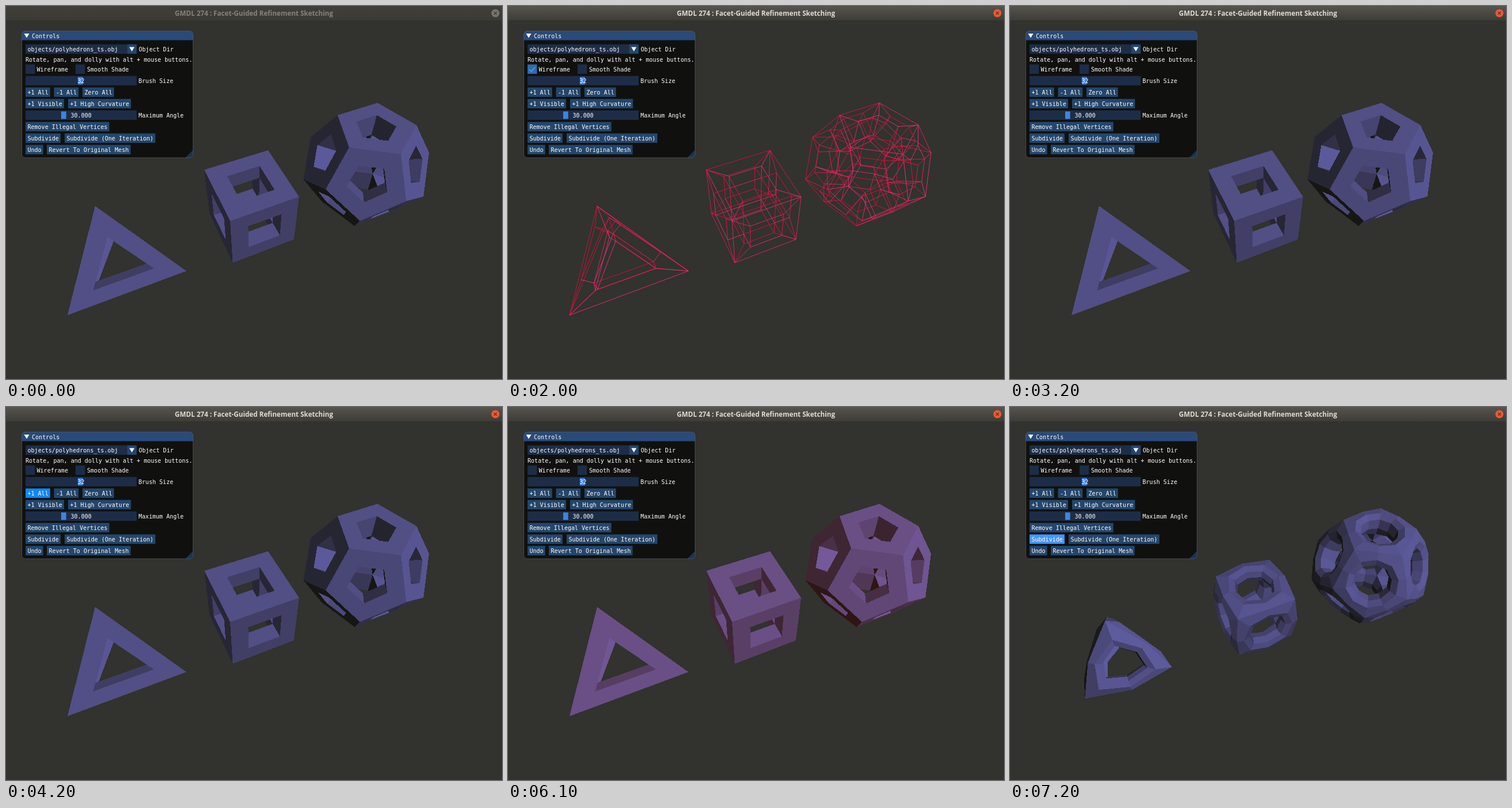
An HTML page with a canvas for the animation above (8000 ms loop, 863 px wide and 649 px high).

```html
<!DOCTYPE html>
<html lang="en">
<head>
<meta charset="utf-8">
<title>Mesh viewer</title>
<style>
html, body { margin: 0; width: 100%; height: 100%; overflow: hidden; background: #32322e; }
canvas { display: block; }
</style>
</head>
<body>
<canvas id="stage" width="863" height="649"></canvas>
<script>
const W = 863, H = 649, LOOP = 8000, PHI = (1 + Math.sqrt(5)) / 2, AMBIENT = 0.25;
const ctx = document.getElementById('stage').getContext('2d');

// Vector helpers
const add = (a, b) => a.map((v, i) => v + b[i]);
const sub = (a, b) => a.map((v, i) => v - b[i]);
const mul = (a, s) => a.map(v => v * s);
const dot = (a, b) => a[0] * b[0] + a[1] * b[1] + a[2] * b[2];
const cross = (a, b) => [a[1] * b[2] - a[2] * b[1], a[2] * b[0] - a[0] * b[2], a[0] * b[1] - a[1] * b[0]];
const unit = a => mul(a, 1 / (Math.hypot(...a) || 1));
const mean = list => mul(list.reduce(add), 1 / list.length);

// All sign variants and cyclic shifts of a vector
function signs(v) {
  const out = [];
  for (let m = 0; m < 8; m++) {
    if (v.every((c, i) => c || !(m >> i & 1))) out.push(v.map((c, i) => m >> i & 1 ? -c : c));
  }
  return out;
}
const cyclic = ([x, y, z]) => [[x, y, z], [z, x, y], [y, z, x]].flatMap(signs);

// Hollow frame of a convex solid: every face gets a half-size hole leading inside
function frameMesh(corners, normals) {
  const verts = [...corners, ...corners.map(v => mul(v, 0.5))];
  const quads = [], n = corners.length;
  for (const dir of normals) {
    const top = Math.max(...corners.map(v => dot(v, dir)));
    const ids = [...corners.keys()].filter(i => dot(corners[i], dir) > top - 0.01);
    const mid = mean(ids.map(i => corners[i]));
    const ax = unit(sub(corners[ids[0]], mid)), ay = cross(unit(dir), ax);
    const angle = i => {
      const d = sub(corners[i], mid);
      return Math.atan2(dot(d, ay), dot(d, ax));
    };
    ids.sort((a, b) => angle(a) - angle(b));
    const base = verts.length, count = ids.length;
    ids.forEach(i => verts.push(mul(add(corners[i], mid), 0.5)));
    ids.forEach((id, i) => {
      const j = (i + 1) % count, next = ids[j];
      quads.push([id, next, base + j, base + i], [base + i, base + j, next + n, id + n]);
    });
  }
  return { verts, quads };
}

// One Catmull-Clark step
function subdivide({ verts, quads }) {
  const centers = quads.map(q => mean(q.map(i => verts[i])));
  const edges = new Map(), around = verts.map(() => ({ faces: [], mids: [] }));
  const key = (a, b) => a < b ? a + '_' + b : b + '_' + a;
  quads.forEach((q, f) => q.forEach((a, i) => {
    const b = q[(i + 1) % 4], k = key(a, b);
    around[a].faces.push(centers[f]);
    if (!edges.has(k)) {
      const mid = mul(add(verts[a], verts[b]), 0.5);
      edges.set(k, { a, b, faces: [] });
      around[a].mids.push(mid);
      around[b].mids.push(mid);
    }
    edges.get(k).faces.push(centers[f]);
  }));
  const out = verts.map((v, i) => {
    const { faces, mids } = around[i], n = mids.length;
    return mul(add(add(mean(faces), mul(mean(mids), 2)), mul(v, n - 3)), 1 / n);
  });
  const first = out.length;
  out.push(...centers);
  for (const e of edges.values()) {
    e.id = out.length;
    out.push(mean([verts[e.a], verts[e.b], ...e.faces]));
  }
  const parts = quads.flatMap((q, f) => q.map((a, i) => [
    a, edges.get(key(a, q[(i + 1) % 4])).id, first + f, edges.get(key(q[(i + 3) % 4], a)).id
  ]));
  return { verts: out, quads: parts };
}

// view: screen x, y and depth of the box corner and its three neighbours
const tetra = [[-1, -1, -1], [1, 1, -1], [1, -1, 1], [-1, 1, 1]];
const solids = [
  {
    mesh: frameMesh(tetra, tetra.map(v => mul(v, -1))),
    view: [[155, 348, 1], [209.3, 505.6, 0.99], [58.1, 393.1, 1.09], [267, 327.9, 1.18]],
    light: [0.07, -0.84, -0.08]
  },
  {
    mesh: frameMesh(signs([1, 1, 1]), cyclic([0, 0, 1])),
    view: [[345, 285, 1], [456, 251, 1.049], [390, 374, 0.903], [354, 361, 1.12]],
    light: [0.02, 0.35, -0.57]
  },
  {
    mesh: frameMesh([...signs([1, 1, 1]), ...cyclic([0, 1 / PHI, PHI])], cyclic([0, PHI, 1])),
    view: [[597, 246, 1], [714, 207, 1.047], [616, 374, 1.055], [530, 228, 1.156]],
    light: [0.19, -0.263, -0.658]
  }
];

function project(p, view) {
  const [u, v, s] = p.map(c => (c + 1) / 2);
  let x = 0, y = 0, w = 0;
  [1 - u - v - s, u, v, s].forEach((k, i) => {
    const m = k * view[i][2];
    x += m * view[i][0];
    y += m * view[i][1];
    w += m;
  });
  return { x: x / w, y: y / w, z: 1 / w };
}

// Projected quads with their brightness
function facets({ view, light }, { verts, quads }) {
  const pts = verts.map(v => project(v, view));
  return quads.map(q => {
    const [a, b, c, d] = q.map(i => verts[i]);
    const n = unit(cross(sub(c, a), sub(d, b)));
    return { pts: q.map(i => pts[i]), lit: Math.min(1, Math.max(0, AMBIENT + dot(n, light))) };
  });
}

function layer() {
  const c = document.createElement('canvas');
  c.width = W;
  c.height = H;
  return c;
}

// Flat shaded picture with a depth buffer
function shaded(list, red) {
  const canvas = layer(), g = canvas.getContext('2d');
  const img = g.createImageData(W, H), depth = new Float32Array(W * H);
  const fill = (a, b, c, rgb) => {
    const area = (b.x - a.x) * (c.y - a.y) - (b.y - a.y) * (c.x - a.x);
    if (Math.abs(area) < 1e-6) return;
    const xs = [a.x, b.x, c.x], ys = [a.y, b.y, c.y];
    for (let y = Math.floor(Math.min(...ys)); y <= Math.max(...ys); y++) {
      for (let x = Math.floor(Math.min(...xs)); x <= Math.max(...xs); x++) {
        const px = x + 0.5, py = y + 0.5;
        const kb = ((px - a.x) * (c.y - a.y) - (py - a.y) * (c.x - a.x)) / area;
        const kc = ((b.x - a.x) * (py - a.y) - (b.y - a.y) * (px - a.x)) / area;
        const ka = 1 - kb - kc;
        if (ka < 0 || kb < 0 || kc < 0) continue;
        const z = ka * a.z + kb * b.z + kc * c.z, at = y * W + x;
        if (z <= depth[at]) continue;
        depth[at] = z;
        img.data.set(rgb, at * 4);
      }
    }
  };
  for (const { pts: [a, b, c, d], lit } of list) {
    const rgb = [22 + red + 72 * lit, 22 + 69 * lit, 20 + 137 * lit, 255];
    fill(a, b, c, rgb);
    fill(a, c, d, rgb);
  }
  g.putImageData(img, 0, 0);
  return canvas;
}

// Neighbouring quads run along a shared edge in opposite directions, so one direction draws it once
function wired(list) {
  const canvas = layer(), g = canvas.getContext('2d');
  g.lineWidth = 0.85;
  for (const { pts, lit } of list) {
    g.strokeStyle = `rgb(${222 + 22 * lit}, ${16 + 42 * lit}, ${60 + 75 * lit})`;
    g.beginPath();
    pts.forEach((a, i) => {
      const b = pts[(i + 1) % 4];
      if (a.x > b.x) return;
      g.moveTo(a.x, a.y);
      g.lineTo(b.x, b.y);
    });
    g.stroke();
  }
  return canvas;
}

const coarse = solids.flatMap(s => facets(s, s.mesh));
const fine = solids.flatMap(s => facets(s, subdivide(s.mesh)));
const pics = { plain: shaded(coarse, 0), marked: shaded(coarse, 24), smooth: shaded(fine, 0), wire: wired(coarse) };

// Pointer states: time, control, pressed
const steps = [
  [0], [500, 'wire', 1], [600, 'wire'], [2000, 'wire', 1], [2100, 'wire'], [2800, 'brush'],
  [3200], [3300, 'add'], [4200, 'add', 1], [4300, 'add'], [5200], [5300, 'visible'],
  [5600], [5700, 'angle'], [6100], [6200, 'remove'], [6600], [6700, 'subdivide'],
  [7000, 'subdivide', 1], [7200, 'subdivide']
];

const INK = '#fff', FIELD = ['#1d2d47', '#24466c', '#316aac'], BUTTON = ['#24466c', '#4296fa', '#0f87fa'];
const ROW = 16.4, CHAR = 6.06;

function box(x, y, w, h, color) {
  ctx.fillStyle = color;
  ctx.fillRect(x, y, w, h);
}

// Control background centred on a row
const field = (x, y, w, color) => box(x, y - ROW / 2 - 0.1, w, ROW, color);

function label(text, x, y) {
  ctx.font = '10.06px "DejaVu Sans Mono", monospace';
  ctx.textAlign = 'left';
  ctx.fillStyle = INK;
  ctx.fillText(text, x, y + 3.6);
}

function arrow(x, y) {
  ctx.fillStyle = INK;
  ctx.beginPath();
  ctx.moveTo(x - 4.5, y - 3.5);
  ctx.lineTo(x + 4.5, y - 3.5);
  ctx.lineTo(x, y + 4);
  ctx.fill();
}

function titleBar(focused) {
  const fade = ctx.createLinearGradient(0, 0, 0, 25);
  fade.addColorStop(0, focused ? '#56544d' : '#403f3a');
  fade.addColorStop(1, focused ? '#3d3c37' : '#3b3a35');
  box(0, 0, W, 25, fade);
  ctx.font = 'bold 11.7px "Open Sans", sans-serif';
  ctx.textAlign = 'center';
  ctx.fillStyle = focused ? '#dfdbd2' : '#85827a';
  ctx.fillText('GMDL 274 : Facet-Guided Refinement Sketching', 431.5, 16.5);
  ctx.fillStyle = focused ? '#ea5a35' : '#77756e';
  ctx.beginPath();
  ctx.arc(851.5, 12.5, 7, 0, 7);
  ctx.fill();
  ctx.strokeStyle = focused ? '#6b2a18' : '#3c3b37';
  ctx.lineWidth = 1.2;
  ctx.beginPath();
  ctx.moveTo(849, 10);
  ctx.lineTo(854, 15);
  ctx.moveTo(854, 10);
  ctx.lineTo(849, 15);
  ctx.stroke();
}

function panel(mode, checked) {
  ctx.beginPath();
  ctx.roundRect(27.5, 43.5, 298, 220.5, 6);
  ctx.fillStyle = '#10110e';
  ctx.fill();
  ctx.save();
  ctx.clip();
  box(27, 43, 299, 16.5, '#294a7a');
  ctx.fillStyle = '#1b3553';
  ctx.beginPath();
  ctx.moveTo(326, 250);
  ctx.lineTo(326, 265);
  ctx.lineTo(311, 265);
  ctx.fill();
  ctx.restore();
  ctx.beginPath();
  ctx.roundRect(27.5, 43.5, 298, 220.5, 6);
  ctx.strokeStyle = 'rgba(110, 110, 128, 0.5)';
  ctx.lineWidth = 1;
  ctx.stroke();
  arrow(36, 51.5);
  label('Controls', 45, 52);

  const button = (text, x, y, id) => {
    field(x, y, text.length * CHAR + 6.4, BUTTON[mode(id)]);
    label(text, x + 3.4, y);
  };
  const slider = (id, y, grab, value, valueX, name) => {
    field(34, y, 193.4, FIELD[mode(id)]);
    box(grab, y - 6.5, 8.7, 13, '#3d85e0');
    label(value, valueX, y);
    label(name, 230.5, y);
  };

  field(34, 75, 177, FIELD[0]);
  field(211, 75, ROW, BUTTON[0]);
  arrow(219, 75);
  label('objects/polyhedrons_ts.obj', 37.5, 75);
  label('Object Dir', 231, 75);
  label('Rotate, pan, and dolly with alt + mouse buttons.', 34, 93);

  field(34, 110, ROW, FIELD[mode('wire')]);
  field(121, 110, ROW, FIELD[0]);
  if (checked) {
    ctx.strokeStyle = '#4296fa';
    ctx.lineWidth = 2;
    ctx.beginPath();
    ctx.moveTo(37, 110.5);
    ctx.lineTo(40.5, 114);
    ctx.lineTo(47, 106.5);
    ctx.stroke();
  }
  label('Wireframe', 53.5, 110);
  label('Smooth Shade', 141, 110);

  slider('brush', 130, 125, '32', 124.5, 'Brush Size');
  button('+1 All', 34, 150, 'add');
  button('-1 All', 83.5, 150);
  button('Zero All', 133, 150);
  button('+1 Visible', 34, 170, 'visible');
  button('+1 High Curvature', 108, 170);
  slider('angle', 190, 96, '30.000', 112.5, 'Maximum Angle');
  button('Remove Illegal Vertices', 34, 210, 'remove');
  button('Subdivide', 34, 230, 'subdivide');
  button('Subdivide (One Iteration)', 102, 230);
  button('Undo', 34, 250);
  button('Revert To Original Mesh', 71, 250);
}

function draw(now) {
  const t = now % LOOP;
  const [, hot, pressed] = steps.filter(s => s[0] <= t).pop();
  const wire = t >= 600 && t < 2100;
  const pic = wire ? 'wire' : t < 4300 ? 'plain' : t < 7200 ? 'marked' : 'smooth';
  box(0, 0, W, H, '#32322e');
  ctx.drawImage(pics[pic], 0, 0);
  titleBar(t >= 500);
  panel(id => !id || id !== hot ? 0 : pressed ? 2 : 1, wire);
  requestAnimationFrame(draw);
}
requestAnimationFrame(draw);
</script>
</body>
</html>
```
